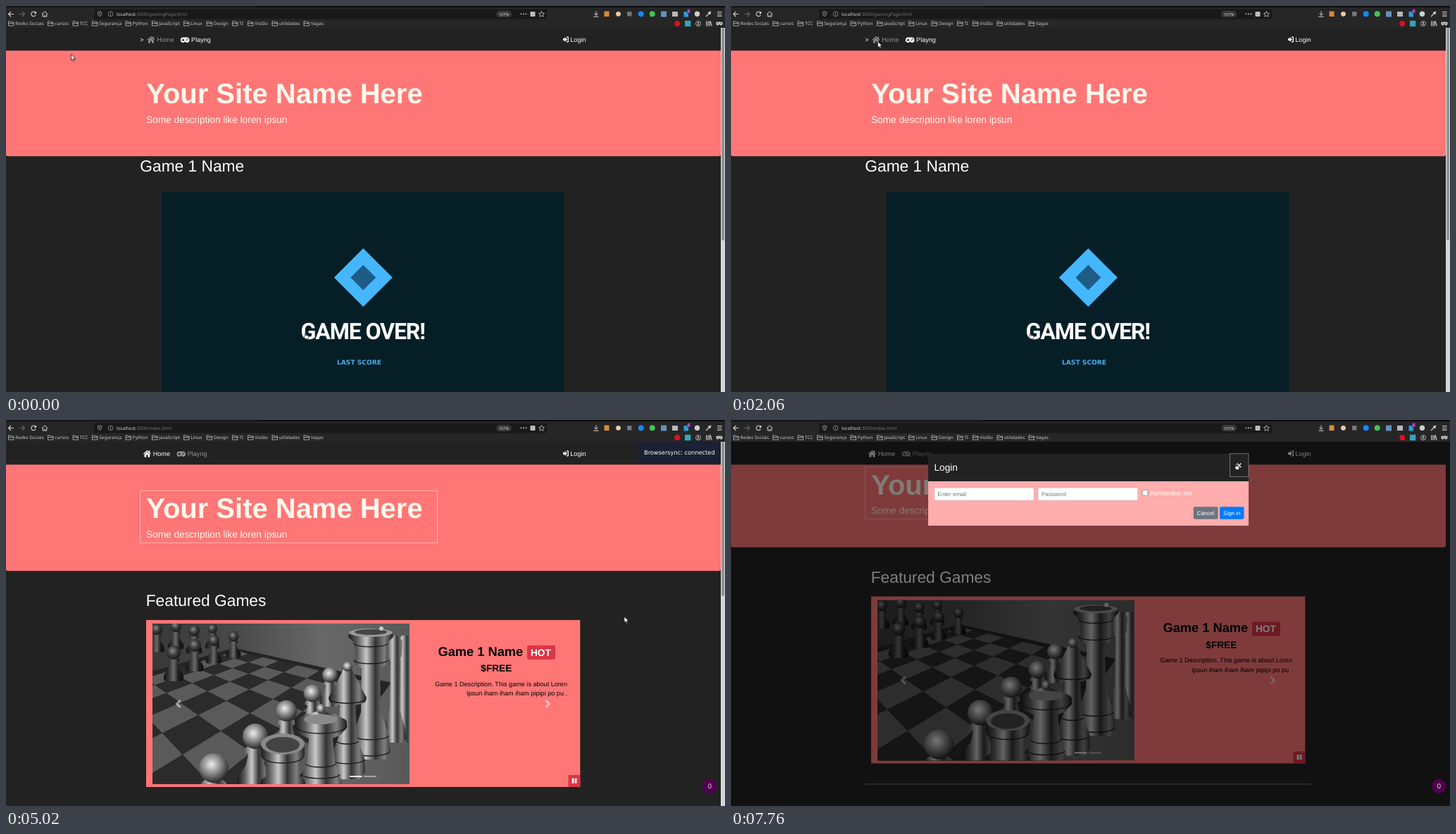
Recreate the animation shown at these times as an HTML page. Size 1021 by 548 pixels, loop 8 s.

```html
<!DOCTYPE html>
<html lang="en">
<head>
<meta charset="utf-8">
<title>Site demo</title>
<style>
html, body { margin: 0; width: 100%; height: 100%; overflow: hidden; background: #222; }
svg { display: block; width: 100vw; height: 100vh; }
text { font-family: "Liberation Sans", Arial, sans-serif; text-rendering: geometricPrecision; white-space: pre; }
.ui { font-family: "Noto Sans", sans-serif; }
.dv { font-family: "DejaVu Sans", sans-serif; }
.b { font-weight: bold; }
.over { font-family: Roboto, sans-serif; font-weight: bold; letter-spacing: -1.2px; }
.end { text-anchor: end; }
.mid { text-anchor: middle; }
</style>
</head>
<body>
<svg id="stage" viewBox="0 0 1021 548" preserveAspectRatio="none"></svg>
<script>
const PINK = '#ff7676', BG = '#222', CREAM = '#fff8ec';

const text = (x, y, size, str, fill = '#fff', cls = '') =>
  `<text x="${x}" y="${y}" font-size="${size}" fill="${fill}" class="${cls}">${str}</text>`;
const rect = (x, y, w, h, fill, more = '') =>
  `<rect x="${x}" y="${y}" width="${w}" height="${h}" fill="${fill}" ${more}/>`;
const circle = (x, y, r, fill, more = '') =>
  `<circle cx="${x}" cy="${y}" r="${r}" fill="${fill}" ${more}/>`;
const ellipse = (x, y, rx, ry, fill) =>
  `<ellipse cx="${x}" cy="${y}" rx="${rx}" ry="${ry}" fill="${fill}"/>`;
const shape = (d, fill, more = '') => `<path d="${d}" fill="${fill}" ${more}/>`;
const line = (d, color, w = 1) => shape(d, 'none', `stroke="${color}" stroke-width="${w}"`);
const at = (x, y, body) => `<g transform="translate(${x} ${y})">${body}</g>`;
const group = (id, body) => `<g id="${id}">${body}</g>`;

// Browser window
const BOOKMARKS = [['Redes Sociais', 3], ['cursos', 59], ['TCC', 94.5], ['Segurança', 122], ['Python', 169.5],
  ['JavaScript', 207], ['Linux', 252], ['Design', 284.5], ['TI', 321], ['Violão', 343], ['utilidades', 377.5], ['Vagas', 422.5]];

function browser() {
  const pale = '#d5d5d5';
  let s = rect(0, 0, 1021, 31, '#262626') + rect(0, 0, 1021, 2, '#0b0b0b') + rect(0, 0, 358, 1.5, '#181818');
  s += line('M11 11.5H3.5M7 8L3.5 11.5L7 15', pale, 1.1) + line('M18.5 11.5H26M23 8L26.5 11.5L23 15', '#666', 1.1);
  s += line('M42 9.6A3.3 3.3 0 1 0 42.2 12.6', pale, 1.1) + shape('M43 7.5V11H39.5Z', pale);
  s += line('M51 11.5L55 7.8L59 11.5M52.2 11V15H57.8V11M55 15V12.5', pale);
  s += rect(125, 4.5, 643, 14, '#191919', 'rx="1.5"');
  s += line('M130.3 8.5L133 7.8L135.7 8.5V11Q135.5 13.5 133 14.8Q130.5 13.5 130.3 11ZM133 9V13', '#aaa', .8);
  s += circle(148.5, 11.3, 3.4, 'none', 'stroke="#aaa" stroke-width=".7"') + line('M148.5 10.8V13.2M148.5 9V9.9', '#aaa', .8);
  s += rect(696.2, 6.8, 21.8, 9.2, '#383838', 'rx="4.6"') + text(707, 13.6, 5.6, '107%', '#ddd', 'ui mid');
  s += [731.5, 735, 738.5].map(x => circle(x, 11.3, 1, '#bbb')).join('') + rect(744.5, 8, 7, 7, '#bbb', 'rx="1"');
  s += line('M760.5 7.5L761.7 10.2L764.5 10.5L762.4 12.4L763 15.2L760.5 13.7L758 15.2L758.6 12.4L756.5 10.5L759.3 10.2Z', '#bbb', .9);
  s += line('M838 7.5V13M835.3 10.7L838 13.3L840.7 10.7M834.5 15.2H841.5', pale);
  s += rect(849.5, 7.5, 7, 7.5, '#d88b3a') + circle(869.5, 11.3, 3.4, '#e6cfae') + rect(882, 8, 6.5, 6.5, '#777', 'rx="1"');
  s += circle(901.7, 11.3, 4, '#1687f5') + circle(917.7, 11.3, 4, '#43c557') + rect(930, 7.5, 8, 8, '#668fbd');
  s += rect(946, 8, 8, 7, '#b9b9b9') + rect(962.5, 8, 6.5, 7.5, '#2c9bd6') + rect(967, 4, 5, 6.5, '#6b1f8e', 'rx="1"') + text(969.5, 9.4, 5, '6', '#fff', 'ui mid');
  s += circle(981.5, 11.3, 3.7, '#cfcfcf') + line('M994 15L998.5 10.5', '#b8c4d8', 1.5) + line('M997.4 8.7L1000.3 11.6M998.9 10.2L1001 8', '#ddd', 1.8);
  s += line('M1010 8.5H1016.5M1010 11.3H1016.5M1010 14.1H1016.5', pale, 1.1);
  s += circle(953.2, 25, 4, '#d8141c') + rect(964, 20.8, 8.3, 8.3, '#35a3bd');
  s += circle(983, 25, 3.6, 'none', 'stroke="#bbb" stroke-width=".8"') + circle(983, 24, 1.3, '#bbb') + line('M980.8 27.2Q983 25.3 985.2 27.2', '#bbb');
  s += line('M994.7 21.5V28.5M997 21.5V28.5M999.2 21.5V28.5M1000.2 21.7L1002.2 28.5', pale, 1.1);
  s += shape('M1008.5 23Q1013 22.2 1017.5 23Q1018 27.5 1015 27.5L1013 26L1011 27.5Q1008 27.5 1008.5 23ZM1010 24.7a1.3 .9 0 0 0 2.4 0a1.3 .9 0 0 0-2.4 0ZM1013.6 24.7a1.3 .9 0 0 0 2.4 0a1.3 .9 0 0 0-2.4 0Z', '#ccc', 'fill-rule="evenodd"');
  s += group('hover', rect(57, 20, 34, 10.5, '#444', 'rx="1"'));
  for (const [name, x] of BOOKMARKS)
    s += line(`M${x + .5} 28V21.8H${x + 3.3}L${x + 4.3} 23H${x + 8}V28ZM${x + .5} 24.6H${x + 8}`, '#bbb', .8) + text(x + 10.3, 27.3, 6.43, name, '#ccc', 'ui');
  return s;
}
const address = page => text(157, 13.8, 6.43, `localhost<tspan fill="#777">:3000/${page}</tspan>`, '#ddd', 'ui');
const scrollbar = (y, h) => rect(1015, 31, 6, 517, '#d6d6d6') + rect(1016.2, y, 3.8, h, '#909090', 'rx="1.9"');

// Site header
const homeIcon = x => at(x, 42.5, shape('M0 5.3L5.4 .5L7.8 2.6V1H9.3V4L10.8 5.3L10 6.2L5.4 2.2L.8 6.2ZM1.6 6.4L5.4 3.1L9.2 6.4V10.2H6.6V7H4.2V10.2H1.6Z', '#fff'));
const padIcon = x => at(x, 43.8, shape('M4 .7H9A3.8 3.8 0 0 1 9 8.3Q7.8 8.2 7.2 7H5.8Q5.2 8.2 4 8.3A3.8 3.8 0 0 1 4 .7ZM3.2 2.7V3.9H2V5.1H3.2V6.3H4.4V5.1H5.6V3.9H4.4V2.7ZM8 4.5a.9 .9 0 0 0 1.8 0a.9 .9 0 0 0-1.8 0ZM9.7 3a.8 .8 0 0 0 1.6 0a.8 .8 0 0 0-1.6 0Z', '#fff', 'fill-rule="evenodd"'));
const loginIcon = at(791, 43.3, shape('M0 2.8H2.5V.8L6 4.2L2.5 7.6V5.6H0Z', '#fff') + line('M5 .8H7.3V7.6H5', '#fff', 1.2));
const navbar = (id, home, play, homeAlpha, playAlpha) => rect(0, 31, 1021, 32.4, BG) +
  `<g id="${id}" opacity="${homeAlpha}">${homeIcon(home)}${text(home + 13.7, 51, 9.1, 'Home')}</g>` +
  `<g opacity="${playAlpha}">${padIcon(play)}${text(play + 15.4, 51, 9.1, 'Playng')}</g>` +
  loginIcon + text(801.3, 51, 9.1, 'Login');
const banner = y => shape(`M0 60H1015V${y + 146.5}q0 2.7 -2.7 2.7H2.7q-2.7 0 -2.7 -2.7Z`, PINK) +
  text(199.2, y + 74.2, 39.97, 'Your Site Name Here', CREAM, 'b') +
  text(199, y + 101.8, 13.67, 'Some description like loren ipsun', CREAM);

function gamePage() {
  const diamond = (r, fill) => shape(`M507.3 ${385.5 - r}l${r} ${r}l${-r} ${r}l${-r} ${-r}Z`, fill);
  return banner(64) + navbar('homeLink', 200.5, 247.7, .5, 1) + text(190.3, 50.8, 9.1, '&gt;') +
    text(190.3, 234.8, 22.76, 'Game 1 Name') + rect(221, 264, 571, 284, '#061e26') +
    diamond(41.5, '#44b7ff') + diamond(18, '#1f5c85') +
    text(418.5, 473.3, 32.2, 'GAME OVER!', '#fff', 'over') +
    at(423, 464, HAND) + text(470, 508.8, 9.1, 'LAST SCORE', '#44b0ee', 'dv b') + scrollbar(31, 302);
}

// Chess picture: mirrored profiles of [half width, y] pairs on a board in perspective
function piece(x, profile, fill = 'url(#steel)') {
  const right = profile.map(([w, y]) => `${x + w} ${y}`);
  const left = profile.map(([w, y]) => `${x - w} ${y}`).reverse();
  return shape('M' + [...right, ...left].join('L') + 'Z', fill);
}
const pawn = (x, y, r, fill = 'url(#steel)', ball = 'url(#ball)') =>
  piece(x, [[.5, .7], [.85, 1], [.85, 1.25], [.55, 1.4], [.75, 2.3], [1.25, 3], [1.4, 3.3], [1.4, 3.9], [1.1, 4.1]]
    .map(([w, h]) => [w * r, y + h * r]), fill) + circle(x, y, r, ball);
const ring = (x, y, rx, ry) => line(`M${x - rx} ${y}A${rx} ${ry} 0 0 0 ${x + rx} ${y}`, '#1a1a1a', 1.3);

function corner(i, j) {
  const u = i / 3, v = j / 5, k = 1 + .259 * u - .459 * v;
  return `${(238 + 168.7 * u - 22.7 * v) / k} ${(375 + 59.4 * u - 120.7 * v) / k}`;
}
const tile = (i, j, i2, j2, fill) => shape(`M${corner(i, j)}L${corner(i2, j)}L${corner(i2, j2)}L${corner(i, j2)}Z`, fill);

function chess() {
  let s = rect(208, 289, 365, 228, 'url(#wall)') + tile(-3.5, -2.1, 4.9, 5.8, '#242424');
  for (let i = -3; i < 5; i++) for (let j = -1; j < 6; j++)
    s += tile(i - .5, j - .5, i + .5, j + .5, (i + j) % 2 ? '#5a5a5a' : '#2b2b2b');
  for (const [x, y, r] of [[214, 297, 8], [241, 293, 8], [267, 299, 8], [293, 296, 7], [323, 307, 7.5], [295, 313, 8], [268, 320, 9], [238, 330, 10]])
    s += pawn(x, y, r, 'url(#dark)', 'url(#dim)');
  for (const x of [566, 552])
    s += piece(x, [[4, 306], [11, 314], [10, 334], [6, 342], [7, 410], [15, 440], [16, 452], [13, 458]]);
  s += piece(518, [[12, 296], [30, 301], [32, 308], [24, 316], [21, 338], [25, 342], [21, 348], [13, 352], [14, 415], [25, 445], [28, 470], [22, 482]]);
  s += ellipse(518, 302, 31, 6, '#999') + ellipse(518, 301, 23, 4, '#444') + circle(533, 296, 3, '#ccc') +
    ring(518, 317, 24, 5) + ring(518, 341, 24, 5) + ring(518, 448, 25, 6) + ring(518, 470, 27, 7);
  for (const [x, y, r] of [[460, 362, 11], [435, 388, 12.5], [398, 413, 15]]) s += pawn(x, y, r);
  s += piece(485, [[5, 352], [11, 364], [27, 394], [25, 401], [11, 405], [13, 450], [24, 480], [25, 500], [18, 510]]) + circle(485, 350, 7, 'url(#ball)') +
    ring(485, 396, 26, 6) + ring(485, 456, 15, 4) + ring(485, 482, 24, 6);
  s += pawn(354, 449, 18);
  s += piece(447, [[5, 405], [6, 414], [20, 417], [37, 428], [37, 437], [28, 447], [17, 452], [20, 485], [32, 520]]);
  s += ellipse(447, 429, 37, 11, 'url(#steel)') + ellipse(447, 425, 24, 7, '#8a8a8a') + ellipse(447, 410, 6, 7, 'url(#ball)') +
    ring(447, 434, 37, 11) + ring(447, 488, 21, 5) + ring(447, 503, 27, 6);
  s += pawn(295, 494, 21);
  s += piece(393, [[31, 461], [31, 477], [25, 484], [24, 506], [31, 511], [32, 520]]) + ellipse(393, 460, 31, 15, '#8a8a8a') + ellipse(393, 461, 24, 11, '#444') +
    ring(393, 478, 29, 9);
  return `<g clip-path="url(#photo)">${s}</g>`;
}

function indexPage() {
  const chevron = (x, dir) => `<g opacity=".5">${line(`M${x - 2.5 * dir} 398L${x + 2.5 * dir} 403L${x - 2.5 * dir} 408`, '#fff', 3)}</g>`;
  const content = banner(65) + rect(190.5, 100.3, 422, 74, 'none', 'stroke="#ffc4bf" stroke-width=".8"') +
    text(198.7, 264.2, 22.76, 'Featured Games') + rect(199, 284, 616.3, 237, PINK) + chess() +
    text(613.5, 334.5, 18.25, 'Game 1 Name', '#000', 'b') + rect(740, 320, 40, 20, '#dc3545', 'rx="2.3"') + text(745, 334.8, 13.65, 'HOT', '#fff', 'b') +
    text(674.3, 357.3, 13.65, '$FREE', '#000', 'b') +
    text(797, 377.7, 9.1, 'Game 1 Description. This game is about Loren', '#000', 'end') +
    text(797, 391.2, 9.1, 'Ipsun iham iham iham pipipi po pu .', '#000', 'end') +
    chevron(245, -1) + chevron(769, 1) +
    rect(488, 505.2, 17.5, 1.7, '#fff') + rect(508.3, 505.2, 17.5, 1.7, '#fff', 'opacity=".5"') +
    rect(798.5, 504, 16.8, 17, '#dc3545', 'rx="1.5"') + rect(803.7, 508.7, 2.7, 7, '#fff') + rect(807.7, 508.7, 2.7, 7, '#fff') +
    rect(190, 550, 634, .8, '#888');
  return group('scroll', content) + navbar('homeHere', 195, 242.3, 1, .5) + group('bar1', scrollbar(31, 219)) + group('bar2', scrollbar(48, 218));
}

function modal() {
  const field = (x, str) => rect(x, 96.4, 141, 17.5, '#fff', 'rx="2" stroke="#ced4da" stroke-width=".6"') + text(x + 4.6, 108, 8, str, '#6c757d');
  const button = (x, w, fill, str) => rect(x, 123.3, w, 17.5, fill, 'rx="2"') + text(x + w / 2, 134.9, 7.98, str, '#fff', 'mid');
  return rect(0, 31, 1021, 517, '#000', 'opacity=".5"') + rect(280, 48, 455, 39, BG) + rect(280, 87, 455, 63, '#ffadad') +
    text(288.5, 72, 13.65, 'Login') + group('focus', rect(708.5, 47.8, 26.5, 32.5, 'none', 'stroke="#888" stroke-width=".8"')) +
    `<g id="close" opacity=".6">${text(721.5, 69.3, 13.65, '×', '#fff', 'b mid')}</g>` +
    field(289, 'Enter email') + field(436.3, 'Password') +
    rect(584.2, 99.6, 7.6, 7.6, '#fff', 'rx="1" stroke="#888" stroke-width=".8"') + text(595, 106.8, 9.1, 'Remember me') +
    button(656.7, 34.8, '#6c757d', 'Cancel') + button(694, 34.5, '#007bff', 'Sign in');
}

const stops = colors => colors.map((c, i) => `<stop offset="${i / (colors.length - 1)}" stop-color="${c}"/>`).join('');
const gradient = (id, ...colors) => `<linearGradient id="${id}">${stops(colors)}</linearGradient>`;
const globe = (id, ...colors) => `<radialGradient id="${id}" cx=".42" cy=".38" r=".62">${stops(colors)}</radialGradient>`;
const ARROW = shape('M.4 .4V9L2.4 7.2L3.8 10.4L5.3 9.8L3.9 6.7H6.6Z', '#fff', 'stroke="#111" stroke-width=".8"');
const HAND = shape('M1.5 .5Q2.6 0 2.7 1.2V3.4L6 4Q6.8 4.3 6.6 5.4L6 8.6H2.4L.3 5.6Q.2 4.6 1.5 5Z', '#fff', 'stroke="#111" stroke-width=".6"');

document.getElementById('stage').innerHTML =
  `<defs>${gradient('steel', '#1a1a1a', '#5c5c5c', '#c8c8c8', '#333', '#808080', '#1c1c1c')}${gradient('dark', '#111', '#333', '#6a6a6a', '#1c1c1c', '#111')}` +
  `${gradient('wall', '#383838', '#4a4a4a', '#686868', '#585858')}${globe('ball', '#eee', '#8c8c8c', '#2a2a2a')}${globe('dim', '#8a8a8a', '#404040', '#181818')}` +
  `<clipPath id="photo">${rect(208, 289, 365, 228, '#000')}</clipPath></defs>` + rect(0, 0, 1021, 548, BG) +
  group('game', gamePage()) + group('index', indexPage()) + group('modal', modal()) +
  group('cart', circle(0, 0, 10.2, '#500050') + text(0, 3.2, 9.1, '0', '#ddd', 'dv mid')) +
  browser() + group('url1', address('gamingPage.html')) + group('url2', address('index.html')) +
  group('toast', shape('M897.5 31H1015V60.5H900.5Q897.5 60.5 897.5 57.5Z', '#1b2032') + text(906, 49, 8.22, 'Browsersync: connected', '#fff', 'dv')) +
  group('status', rect(-1, 538.3, 82, 11, '#303030', 'stroke="#555" stroke-width=".6"') + text(1, 545.3, 6.43, 'localhost:3000/index.html', '#ddd', 'ui')) +
  group('arrow', ARROW) + group('hand', HAND);

// Pointer stops: time, x, y
const POINTER = [[0, 92, 68], [580, 60, 22], [780, 58.5, 22], [1100, 63, 28], [1120, 67.5, 34.5], [1260, 85, 44], [1280, 103, 53],
  [1420, 126, 59], [1440, 148, 63], [1580, 159, 64], [1600, 169.5, 64], [1740, 178, 66], [1760, 185, 65], [1900, 192, 60],
  [1920, 198, 56], [2060, 208, 50], [2080, 219.5, 45], [5020, 877.5, 278.5], [5820, 819, 72], [6840, 808.5, 50], [7760, 715, 62]];
const $ = id => document.getElementById(id);
const show = (id, on) => $(id).style.display = on ? '' : 'none';
const move = (id, x, y) => $(id).setAttribute('transform', `translate(${x} ${y})`);

function draw(t) {
  const loaded = t >= 5020, scrolled = t >= 5820, open = t >= 6840, closing = t >= 7760;
  for (const id of ['game', 'url1']) show(id, !loaded);
  for (const id of ['index', 'url2', 'cart']) show(id, loaded);
  show('toast', loaded && !scrolled);
  show('bar1', !scrolled);
  show('bar2', scrolled && !open);
  show('modal', open);
  show('focus', closing);
  $('close').setAttribute('opacity', closing ? .85 : .6);
  move('scroll', 0, scrolled ? -33.5 : 0);
  move('cart', open ? 1005.5 : 999.3, 520);

  show('hover', t >= 580 && t < 1100);
  $('homeLink').setAttribute('opacity', t >= 2080 ? .75 : .5);
  show('status', t >= 2220 && !loaded);
  $('status').setAttribute('opacity', t < 2240 ? .3 : t < 2380 ? .6 : 1);

  const [, x, y] = POINTER.filter(p => p[0] <= t).pop();
  const link = (t >= 2080 && !loaded) || open;
  show('arrow', !link);
  show('hand', link);
  move(link ? 'hand' : 'arrow', x, y);
}

const start = performance.now();
function tick() {
  draw((performance.now() - start) % 8000);
  requestAnimationFrame(tick);
}
tick();
</script>
</body>
</html>
```
